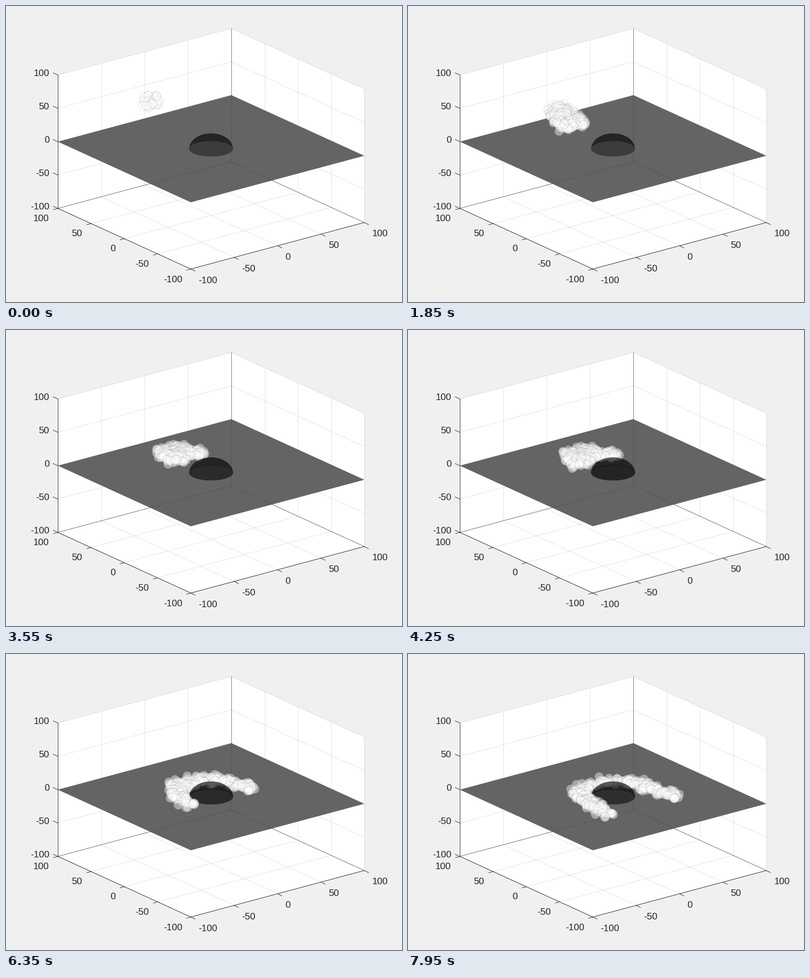
Write a matplotlib script that moves like this. It is 840x630 px and loops after 8 s.

```python
import numpy as np
import matplotlib.pyplot as plt
from matplotlib.animation import FuncAnimation

W, H, DPI = 840, 630, 100
FRAMES, STEP = 160, 50
PX = 72 / DPI
INK = "#262626"
TICKS = (-100, -50, 0, 50, 100)
COUNT = 270

plt.rcParams["font.family"] = "Liberation Sans"
fig = plt.figure(figsize=(W / DPI, H / DPI), dpi=DPI, facecolor="#f0f0f0")
ax = fig.add_axes([0, 0, 1, 1])
ax.set_xlim(0, W)
ax.set_ylim(H, 0)
ax.axis("off")


def project(x, y, z):
    """Orthographic view of the box, in pixels."""
    return (435 + 1.84 * x - 1.41 * y,
            303.8 - 0.495 * x - 0.645 * y - 1.42 * z)


def segment(a, b, color=INK, alpha=1.0, z=1.0):
    (x0, y0), (x1, y1) = project(*a), project(*b)
    ax.plot([x0, x1], [y0, y1], color=color, alpha=alpha, lw=PX, zorder=z)


def polygon(points, color, z):
    ax.fill(*zip(*[project(*p) for p in points]), color=color, lw=0, zorder=z)


def label(x, y, value, align):
    ax.text(x, y, str(value), fontsize=20 * PX, color=INK, ha=align,
            va="center_baseline", zorder=6)


def tick(point, dx, dy):
    x, y = project(*point)
    ax.plot([x, x + dx], [y, y + dy], color=INK, lw=PX, zorder=1)


def draw_box():
    polygon([(-100, 100, 100), (100, 100, 100), (100, -100, 100),
             (100, -100, -100), (-100, -100, -100), (-100, 100, -100)],
            "white", 0)
    for v in TICKS:
        for a, b in (((v, 100, -100), (v, 100, 100)),
                     ((-100, 100, v), (100, 100, v)),
                     ((100, v, -100), (100, v, 100)),
                     ((100, -100, v), (100, 100, v)),
                     ((v, -100, -100), (v, 100, -100)),
                     ((-100, v, -100), (100, v, -100))):
            segment(a, b, alpha=0.13)
    corner = (100, 100, -100)
    for end in ((100, 100, 100), (-100, 100, -100), (100, -100, -100)):
        segment(corner, end, alpha=0.4)
        segment(corner, end, color="black", alpha=0.15, z=2.1)
    front = (-100, -100, -100)
    left = (-100, 100, -100)
    segment(left, (-100, 100, 100))
    segment(front, left)
    segment(front, (100, -100, -100))
    for i, v in enumerate(TICKS):
        tick((-100, 100, v), -10, -4.5)
        tick((-100, v, -100), -9, 2.5)
        tick((v, -100, -100), 9, 4.5)
        label(92, 425.5 - 71 * i, v, "right")
        label(374 - 70.7 * i, 580 - 32.5 * i, v, "right")
        label(408 + 92.2 * i, 582 - 24.8 * i, v, "left")


def draw_ground():
    polygon([(-100, -100, 0), (-100, 100, 0), (100, 100, 0), (100, -100, 0)],
            "#646464", 2)


def draw_dome():
    a = np.linspace(0, np.pi, 80)
    cx, cy = 435, 303.8
    rx, top, flat = 46.4, 32.7, 16.3
    xs = cx + rx * np.cos(a)
    outline_x = np.r_[xs, xs[::-1]]
    ax.fill(outline_x, np.r_[cy - top * np.sin(a), cy + flat * np.sin(a[::-1])],
            color="black", alpha=0.64, lw=0, zorder=4)
    disc, = ax.fill(outline_x, np.r_[cy - flat * np.sin(a),
                                     cy + flat * np.sin(a[::-1])],
                    color="#3c3c3c", lw=0, zorder=4.1)
    rim, = ax.plot(xs, cy - flat * np.sin(a), color="#141414", lw=1.5 * PX,
                   alpha=0, zorder=4.2)
    return disc, rim


def simulate():
    """Balls drop from a source, drift along -y and part around the dome."""
    rng = np.random.default_rng(11)
    ball = rng.normal(size=(COUNT, 3))
    ball /= np.linalg.norm(ball, axis=1)[:, None]
    ball *= rng.random((COUNT, 1)) ** (1 / 3)
    x = 9.5 * ball[:, 0]
    y = 90 + 9.5 * ball[:, 1]
    z = 30 + 11 * ball[:, 2]
    birth = np.maximum(0, 1.42 * np.arange(COUNT) / COUNT - 0.13)
    speed = 18 - 3.5 * birth + rng.uniform(-0.8, 0.8, COUNT)
    radius = rng.uniform(22, 34, COUNT)
    floor = 3 + 8 * rng.random(COUNT)
    spread = 0.35 * x
    drift = np.sign(x) * rng.uniform(1.5, 3.5, COUNT)
    dt = STEP / 1000
    path = []
    for k in range(FRAMES):
        t = k * dt
        alive = birth <= t
        path.append((x.copy(), y.copy(), z.copy(), alive))
        r2 = np.maximum(x * x + y * y, 100)
        bend = radius ** 2 / r2 ** 2
        vx = speed * bend * 2 * x * y + spread * (t - birth < 2)
        vy = -speed * np.minimum(1 - bend * (y * y - x * x), 1.15)
        past = y < 0
        vx = np.where(past, drift, vx)
        vy = np.where(past, -speed, vy)
        x = x + alive * vx * dt
        y = y + alive * vy * dt
        z = np.where(alive, np.maximum(np.minimum(z, floor), z - 13 * dt), z)
    return path


def balls(z):
    return ax.scatter([], [], s=(19 * PX) ** 2, facecolors=[(1, 1, 1, 0.42)],
                      edgecolors=[(0.5, 0.5, 0.5, 0.33)], linewidths=0.8 * PX,
                      zorder=z)


draw_box()
draw_ground()
disc, rim = draw_dome()
behind, before = balls(3), balls(5)
path = simulate()


def update(k):
    x, y, z, alive = path[k]
    depth = 0.608 * x + 0.794 * y
    order = np.argsort(-depth)
    order = order[alive[order]]
    points = np.column_stack(project(x, y, z))[order]
    far = depth[order] > 0
    behind.set_offsets(points[far])
    before.set_offsets(points[~far])
    t = k * STEP / 1000
    shade = np.interp(t, [2, 4.2, 8], [60, 36, 46]) / 255
    disc.set_color((shade,) * 3)
    rim.set_alpha(np.interp(t, [2.4, 4.2], [0, 0.8]))
    return behind, before, disc, rim


anim = FuncAnimation(fig, update, frames=FRAMES, interval=STEP, repeat=True,
                     repeat_delay=0, blit=False)
plt.show()
```
